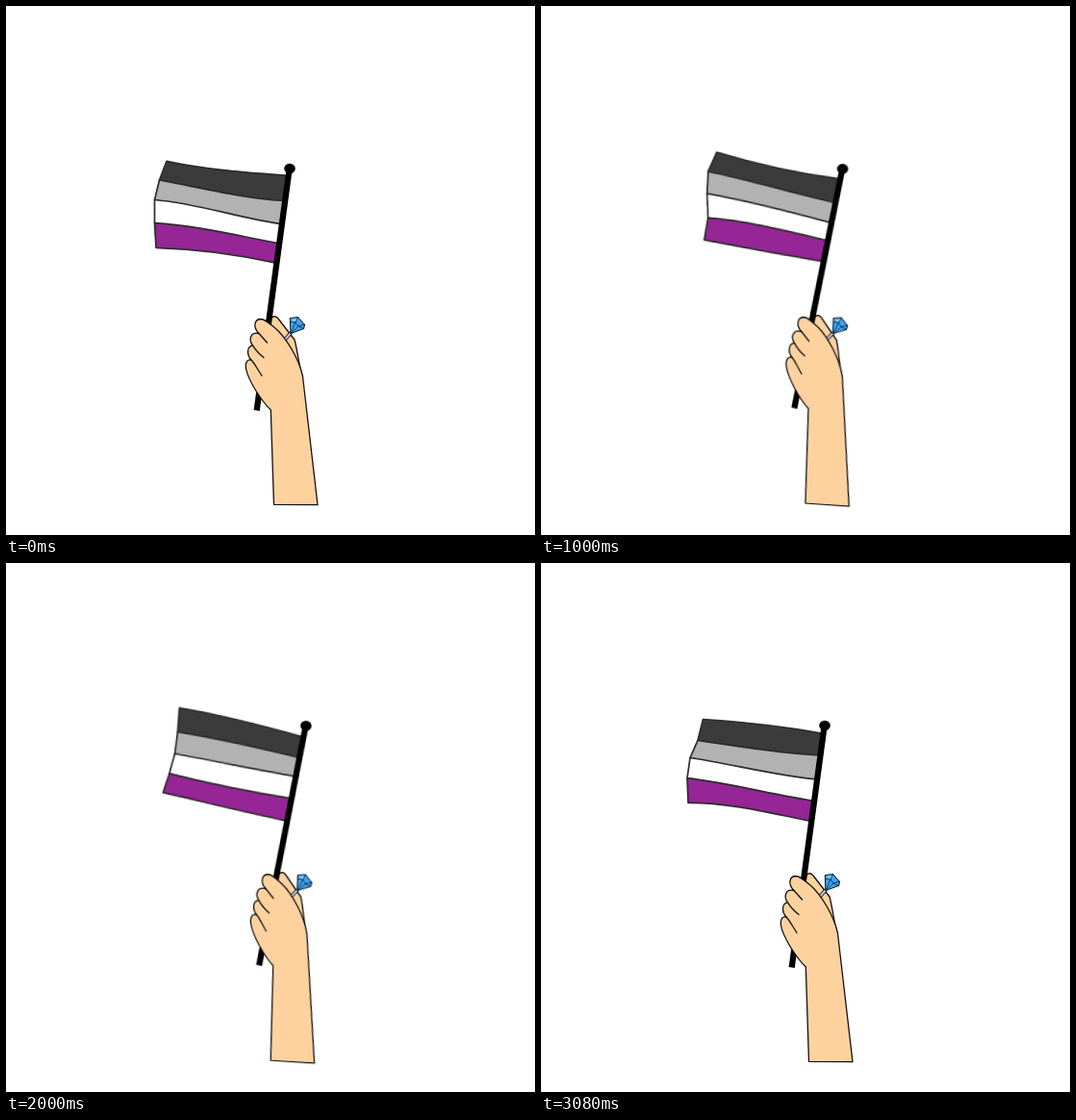
An HTML page without scripts for the animation above (3.16 s loop, 550 by 550 pixels).

```html
<!DOCTYPE html>
<html lang="en">
<head>
<meta charset="utf-8">
<title>Waving flag</title>
<style>
  html, body { margin: 0; width: 100%; height: 100%; overflow: hidden; background: #fff; }
  svg { display: block; width: 100vw; height: 100vh; }

  /* 38 drawings per loop; steps() keeps the frame-by-frame feel */
  .arm, .arm .stripe { animation: sway 3160ms -7ms infinite; }
  .arm { transform-origin: 299px 461px; stroke: #111; stroke-width: 1.3; stroke-linejoin: round; stroke-linecap: round; }
  .arm .black { animation-name: black; fill: #3b3b3b; }
  .arm .grey { animation-name: grey; fill: #b2b2b2; }
  .arm .white { animation-name: white; fill: #fff; }
  .arm .purple { animation-name: purple; fill: #962596; }
  .stripe { stroke: #2c2c2c; stroke-width: 1.7; }
  .skin { fill: #fdd29f; }
  .line { fill: none; }

  @keyframes sway {
    0% { transform: rotate(0deg); animation-timing-function: steps(5); }
    13.158% { transform: rotate(1.92deg); animation-timing-function: steps(7); }
    31.579% { transform: rotate(3.65deg); animation-timing-function: steps(5); }
    44.737% { transform: rotate(5deg); animation-timing-function: steps(4); }
    55.263% { transform: rotate(4.02deg); animation-timing-function: steps(6); }
    71.053% { transform: rotate(2.62deg); animation-timing-function: steps(5); }
    84.211% { transform: rotate(1.47deg); animation-timing-function: steps(5); }
    97.368%, 100% { transform: rotate(0deg); animation-timing-function: steps(1); }
  }

  /* Six poses of the cloth; each stripe tucks under the next one */
  @keyframes black {
    0%, 42.105%, 86.842% { d: path("M167 161.3C206 170 250 173 294 176.5l-4 30L159.5 181Z"); animation-timing-function: steps(4); }
    10.526%, 52.632%, 97.368%, 100% { d: path("M168.5 162.5C206 165 250 169 294 177.5l-4 30L163 184.3Z"); animation-timing-function: steps(1); }
    13.158%, 55.263% { d: path("M164.2 159C206 160 250 168 294 180.5l-4 30L165.4 185.3Z"); animation-timing-function: steps(6); }
    28.947%, 71.053% { d: path("M160.8 157C206 165 250 175 294 181.5l-4 30L158.9 181Z"); animation-timing-function: steps(1); }
    31.579%, 73.684% { d: path("M163.3 160C206 170 250 177 294 179.5l-4 30L155.6 180.6Z"); animation-timing-function: steps(3); }
    39.474%, 81.579%, 84.211% { d: path("M165.2 160.4C206 170 250 174 294 177.5l-4 30L156.5 181.7Z"); animation-timing-function: steps(1); }
  }
  @keyframes grey {
    0%, 42.105%, 86.842% { d: path("M159.5 181C203 189 246 200 291 202.5l-4 30L154.5 201.5Z"); animation-timing-function: steps(4); }
    10.526%, 52.632%, 97.368%, 100% { d: path("M163 184.3C203 190 246 198 291 199.8l-4 30L155 202.5Z"); animation-timing-function: steps(1); }
    13.158%, 55.263% { d: path("M165.4 185.3C203 188 246 194 291 200.2l-4 30L161 206Z"); animation-timing-function: steps(6); }
    28.947%, 71.053% { d: path("M158.9 181C203 186 246 195 291 205l-4 30L160 206Z"); animation-timing-function: steps(1); }
    31.579%, 73.684% { d: path("M155.6 180.6C203 187 246 198 291 204.8l-4 30L156 203.6Z"); animation-timing-function: steps(3); }
    39.474%, 81.579%, 84.211% { d: path("M156.5 181.7C203 187 246 199 291 203.7l-4 30L155.2 201.7Z"); animation-timing-function: steps(1); }
  }
  @keyframes white {
    0%, 42.105%, 86.842% { d: path("M154.5 201.5C199 205 243 221 288 227l-4 30L154.5 225.7Z"); animation-timing-function: steps(4); }
    10.526%, 52.632%, 97.368%, 100% { d: path("M155 202.5C199 209 243 221 288 225l-4 30L152 223.7Z"); animation-timing-function: steps(1); }
    13.158%, 55.263% { d: path("M161 206C199 214 243 219 288 221.5l-4 30L152.8 223.8Z"); animation-timing-function: steps(6); }
    28.947%, 71.053% { d: path("M160 206C199 207 243 215 288 223.2l-4 30L159.2 230Z"); animation-timing-function: steps(1); }
    31.579%, 73.684% { d: path("M156 203.6C199 208 243 217 288 226l-4 30L158.6 228.6Z"); animation-timing-function: steps(3); }
    39.474%, 81.579%, 84.211% { d: path("M155.2 201.7C199 206 243 219 288 227l-4 30L155.9 226.7Z"); animation-timing-function: steps(1); }
  }
  @keyframes purple {
    0%, 42.105%, 86.842% { d: path("M154.5 225.7C197 228 241 239 285 247L282 267.4C240 258 198 252.5 156 251.3Z"); animation-timing-function: steps(4); }
    10.526%, 52.632%, 97.368%, 100% { d: path("M152 223.7C197 229 241 241 285 247.7L282 268.7C240 260.5 198 249 153 249.3Z"); animation-timing-function: steps(1); }
    13.158%, 55.263% { d: path("M152.8 223.8C197 232 241 241 285 246.9L282 270C240 261 198 252 148.4 245.3Z"); animation-timing-function: steps(6); }
    28.947%, 71.053% { d: path("M159.2 230C197 237 241 241 285 244L282 268.2C240 265 198 258 153 248.5Z"); animation-timing-function: steps(1); }
    31.579%, 73.684% { d: path("M158.6 228.6C197 229 241 237 285 244.6L282 266.4C240 262 198 257 156.1 251.8Z"); animation-timing-function: steps(3); }
    39.474%, 81.579%, 84.211% { d: path("M155.9 226.7C197 229 241 238 285 247L282 267C240 260 198 254 156.5 251.7Z"); animation-timing-function: steps(1); }
  }
</style>
</head>
<body>
<svg viewBox="0 0 550 550">
  <g class="arm">
    <path class="stripe black" d="M167 161.3C206 170 250 173 294 176.5l-4 30L159.5 181Z"/>
    <path class="stripe grey" d="M159.5 181C203 189 246 200 291 202.5l-4 30L154.5 201.5Z"/>
    <path class="stripe white" d="M154.5 201.5C199 205 243 221 288 227l-4 30L154.5 225.7Z"/>
    <path class="stripe purple" d="M154.5 225.7C197 228 241 239 285 247L282 267.4C240 258 198 252.5 156 251.3Z"/>

    <path class="skin" d="M274 328C276 322.5 280 321 283 325L300 347C303 358 304 370 308 385L285 360Z"/>
    <path d="M294.7 169L260.7 420.5" stroke="#000" stroke-width="6.2" stroke-linecap="butt"/>
    <ellipse cx="295" cy="169" rx="5.8" ry="5.2" fill="#000" stroke="none"/>

    <!-- ring -->
    <path class="line" d="M288.5 348.5L296.5 339.5" stroke-width="3.8" stroke-linecap="butt"/>
    <path class="line" d="M289 348L296.5 339.5" stroke="#c9c4de" stroke-width="2" stroke-linecap="butt"/>
    <path d="M295.3 324.5L303.5 323.5L310.5 331.5L309.5 335.5L295.8 340.5Z" fill="#40a3f2" stroke="#10263c" stroke-width="1.1"/>
    <path d="M297 326L302.5 325L301 329Z" fill="#8fd0ff" stroke="none"/>
    <path class="line" d="M295.5 328.5L301 329L304 333L309.5 335.5M301 329L303.5 323.5M304 333L310.3 331M301 329L295.8 340.5L304 333" stroke="#10263c" stroke-width=".8"/>

    <!-- hand and forearm -->
    <path class="skin" d="M278.5 518.3L275.3 420C266 411 252 390 249.5 377C248.5 370 251.5 366.5 255.5 368.5C250 363 250 354 256.5 352.8C252 347 254 338.5 263 340.5C256.5 334 258 325.5 265 325.5C270 326 275 331 280 335C290.5 344 304.5 366 308.5 385L324 518.7Z"/>
    <path class="line" d="M263 340.5L271.5 350M256.5 352.8C259 357 263 361.5 268 365.5M255.5 368.5C258 371 262 378.5 266 384.5"/>
  </g>
</svg>
</body>
</html>
```
